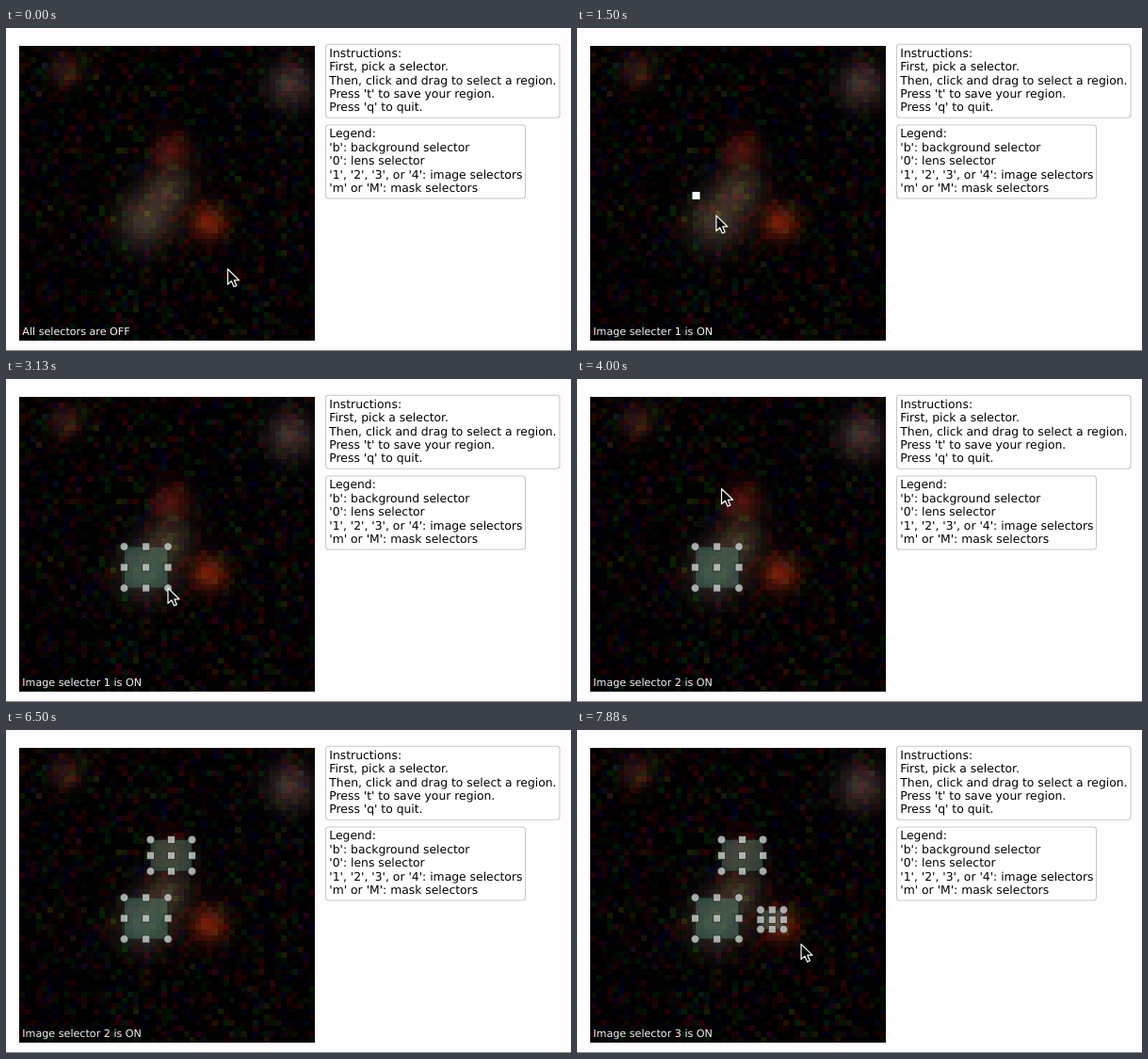
These frames come from a looping animation (600 by 343 pixels, 8000 ms). An HTML page with a canvas:

```html
<!DOCTYPE html>
<html lang="en">
<head>
<meta charset="utf-8">
<title>Region selector</title>
<style>
html, body { margin: 0; width: 100%; height: 100%; overflow: hidden; background: #fdfdfd; }
canvas, svg { position: absolute; left: 0; top: 0; }
text { font-family: "DejaVu Sans", sans-serif; text-rendering: geometricPrecision; }
#panels text { font-size: 12.36px; }
#panels rect { fill: #fefefe; stroke: #cacaca; stroke-width: 1.1; }
</style>
</head>
<body>
<canvas width="600" height="343"></canvas>
<svg width="600" height="343" viewBox="0 0 600 343">
  <g id="panels"></g>
  <path d="M0 342.5H600" stroke="#8c8c8c"/>
  <text id="status" x="17.3" y="326.3" font-size="11.15" fill="#f2f2f2"></text>
  <g id="boxes"></g>
  <path id="cursor" d="M0 0V16.3L3.9 12.8L6.5 18.8L9.3 17.6L6.8 11.8H12Z"
    fill="#080808" stroke="#f4f4f4" stroke-width="1.25" stroke-linejoin="round"/>
</svg>
<script>
const $ = id => document.getElementById(id);
const LOOP = 8000, STEP = 125, LAG = 200, TRAVEL = 600;
const clamp = v => Math.min(1, Math.max(0, v));
const mix = (a, b, u) => a.map((v, i) => v + (b[i] - v) * u);

// Sky image: faint noise plus soft round sources
const sources = [
  { at: [216, 207], r: 13, rgb: [112, 28, 6] },
  { at: [147, 205], r: 20, rgb: [60, 48, 36] },
  { at: [172, 172], r: 18, rgb: [50, 36, 29] },
  { at: [176, 130], r: 13, rgb: [68, 16, 9] },
  { at: [64, 46], r: 12, rgb: [44, 22, 14] },
  { at: [302, 60], r: 17, rgb: [58, 42, 40] },
];
let seed = 77;
function rand() {
  seed = (seed * 1664525 + 1013904223) % 4294967296;
  return seed / 4294967296;
}
const noise = size => Math.max(0, size * (rand() + rand() + rand() - 1.5) - 5);

function drawSky() {
  const ctx = document.querySelector("canvas").getContext("2d");
  const n = 52, edge = (i, start, size) => Math.round(start + i * size / n);
  for (let j = 0; j < n; j++) for (let i = 0; i < n; i++) {
    const x = edge(i, 14, 314), w = edge(i + 1, 14, 314) - x;
    const y = edge(j, 19, 313), h = edge(j + 1, 19, 313) - y;
    const cell = [38, 27, 25].map(noise);
    for (const { at, r, rgb } of sources) {
      const d = Math.hypot(x + w / 2 - at[0], y + h / 2 - at[1]) / r;
      rgb.forEach((c, k) => cell[k] += c * Math.exp(-d * d / 2));
    }
    ctx.fillStyle = `rgb(${cell.map(Math.round)})`;
    ctx.fillRect(x, y, w, h);
  }
}

function panel(y, width, lines) {
  return `<rect x="339.5" y="${y}" width="${width}" height="78" rx="3"/>` +
    lines.map((s, i) => `<text x="343.3" y="${y + 13.4 + i * 14.4}">${s}</text>`).join("");
}
$("panels").innerHTML =
  panel(17.3, 248.5, ["Instructions:", "First, pick a selector.",
    "Then, click and drag to select a region.",
    "Press 't' to save your region.", "Press 'q' to quit."]) +
  panel(103, 212, ["Legend:", "'b': background selector", "'0': lens selector",
    "'1', '2', '3', or '4': image selectors", "'m' or 'M': mask selectors"]);

// Each selector: key pressed, pointer travels to a corner, then drags to the opposite one
const home = [235.5, 256];
const drags = [
  { key: 750, press: 1375, span: 1125, from: [125.5, 178], to: [172, 222], label: "Image selecter 1 is ON" },
  { key: 3375, press: 5030, span: 240, from: [153.5, 116.5], to: [197.5, 150], label: "Image selector 2 is ON" },
  { key: 7000, press: 7630, span: 280, from: [195, 191], to: [240, 229], label: "Image selector 3 is ON" },
];

// A drag starts fast and settles slowly
const corner = (d, t) => mix(d.from, d.to, Math.cbrt(clamp((t - d.press) / d.span)));

function pointer(t) {
  const i = drags.findLastIndex(d => t >= d.key);
  if (i < 0) return home;
  const d = drags[i], start = i ? drags[i - 1].to : home;
  const u = clamp((t - d.key) / TRAVEL);
  return u < 1 ? mix(start, d.from, u * u * (3 - 2 * u)) : corner(d, t);
}

const square = (x, y, fill) =>
  `<rect x="${x - 4}" y="${y - 4}" width="8" height="8" fill="${fill}"/>`;

function selection(d, t) {
  if (t < d.press) return "";
  const [x, y] = d.from, [ex, ey] = corner(d, t - LAG);
  if (ex === x) return square(x + 1, y, "#fff");
  const w = ex - x, h = ey - y, grey = "rgba(196,201,198,.84)";
  let out = `<rect x="${x}" y="${y}" width="${w}" height="${h}"
    fill="rgba(72,134,116,.43)" stroke="#101412"/>`;
  for (const v of [0, .5, 1]) for (const u of [0, .5, 1]) {
    const cx = x + u * w, cy = y + v * h;
    out += u !== .5 && v !== .5
      ? `<circle cx="${cx}" cy="${cy}" r="4.3" fill="${grey}"/>`
      : square(cx, cy, grey);
  }
  return `<g stroke="#181c1a" stroke-width=".7">${out}</g>`;
}

function frame(now) {
  const t = Math.floor(now % LOOP / STEP) * STEP;
  const active = drags.findLast(d => t >= d.key);
  $("cursor").setAttribute("transform", `translate(${pointer(t)})`);
  $("cursor").style.display = t >= 6000 && t < 7000 ? "none" : "";
  $("status").textContent = active ? active.label : "All selectors are OFF";
  $("boxes").innerHTML = drags.map(d => selection(d, t)).join("");
  requestAnimationFrame(frame);
}

drawSky();
requestAnimationFrame(frame);
</script>
</body>
</html>
```
